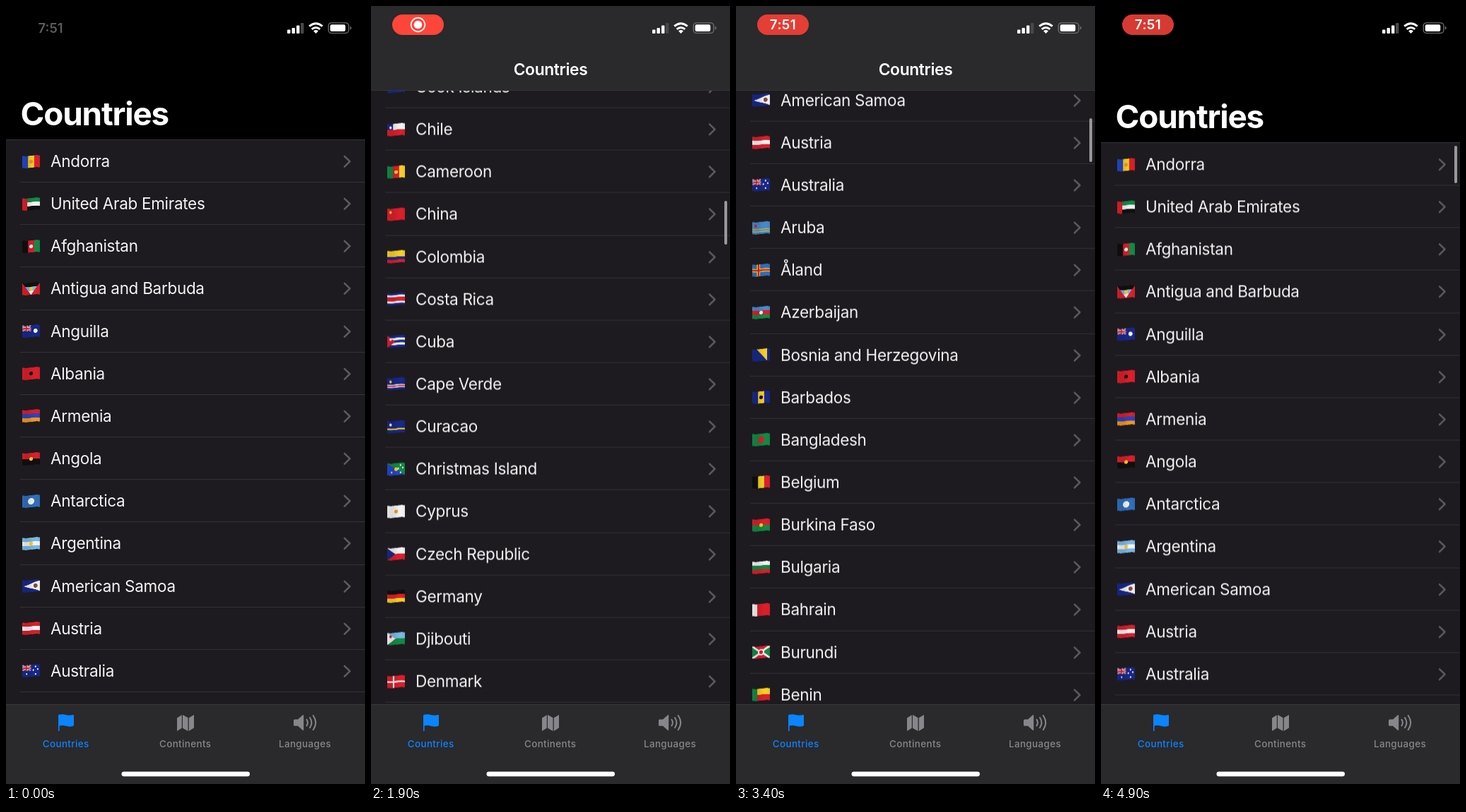
These frames come from a looping animation (508x1102 px, 5 s). An HTML page with a canvas:

```html
<!DOCTYPE html>
<html lang="en">
<head>
<meta charset="utf-8">
<title>Countries</title>
<style>
html, body { margin: 0; width: 100%; height: 100%; overflow: hidden; background: #1d1b1f; }
#stage { position: relative; width: 508px; height: 1102px; overflow: hidden; background: #1d1b1f;
  font-family: Inter, Roboto, sans-serif; color: #f4f4f5; }
#stage > * { position: absolute; left: 0; }
#list { top: 189.8px; width: 508px; will-change: transform; }
.row { position: relative; height: 60.17px; line-height: 60.17px; padding-left: 63px;
  font-size: 22.5px; letter-spacing: -.3px; white-space: nowrap; }
.row::after { content: ""; position: absolute; left: 20px; right: 0; bottom: 0; height: 1px; background: #343236; }
.row canvas { position: absolute; left: 23px; top: 20.5px; width: 25px; height: 19px; }
.row svg { position: absolute; left: 476px; top: 20px; }
#header { top: 0; width: 508px; overflow: hidden; background: #000; box-sizing: border-box; border-bottom: 1px solid #353437; }
#bar { top: 0; width: 508px; height: 119px; background: #2a292c; }
#thumb { left: 499.5px !important; width: 4.5px; border-radius: 3px; background: #98979a; }
svg text { font-family: Inter, Roboto, sans-serif; }
</style>
</head>
<body>
<div id="stage">
  <div id="list"></div>
  <div id="header">
    <svg width="508" height="260"><text id="large" x="20.5" y="169" font-size="45.8" font-weight="700" letter-spacing="-1.15" fill="#fff">Countries</text></svg>
  </div>
  <div id="bar"></div>
  <div id="thumb"></div>
  <svg width="508" height="1102" viewBox="0 0 508 1102">
    <text id="title" x="254" y="98" font-size="22.8" font-weight="600" letter-spacing="-.35" text-anchor="middle" fill="#fff">Countries</text>

    <text id="clock" x="63" y="38" font-size="18.5" font-weight="600" text-anchor="middle" fill="#5c5c5e">7:51</text>
    <g id="pill">
      <rect id="pillShape" x="30" y="12" width="73" height="29" rx="14.5"/>
      <g id="record" fill="#fff">
        <circle cx="66.5" cy="26.5" r="9.8" fill="none" stroke="#fff" stroke-width="1.7"/>
        <circle cx="66.5" cy="26.5" r="5.8"/>
      </g>
      <text id="pillClock" x="66.5" y="33.2" font-size="18.8" font-weight="600" letter-spacing=".5" text-anchor="middle" fill="#fff">7:51</text>
    </g>

    <g fill="#fff">
      <rect x="398" y="33.5" width="4.4" height="5.5" rx="1"/>
      <rect x="404.5" y="31" width="4.4" height="8" rx="1"/>
      <rect x="411" y="27.5" width="4.4" height="11.5" rx="1"/>
      <rect x="417" y="24" width="4.4" height="15" rx="1" fill="#48474a"/>
      <rect x="458.7" y="26.2" width="21.6" height="9.8" rx="2.2"/>
      <path d="M486.8 28.5q2 .8 2 2.6t-2 2.6z" fill="#6f6e71"/>
      <path d="M438.5 39l-3.4-3.6q3.4-2.6 6.8 0z"/>
    </g>
    <rect x="456.3" y="23.8" width="28.6" height="14.6" rx="4.2" fill="none" stroke="#6f6e71" stroke-width="1.3"/>
    <path d="M429.2 28.7q9.3-7.8 18.6 0M432.7 32.8q5.8-4.7 11.6 0" fill="none" stroke="#fff" stroke-width="2.9"/>

    <rect y="989" width="508" height="113" fill="#2a292c"/>
    <rect y="989" width="508" height="1" fill="#39383b"/>
    <path d="M74 1005q0-1 1-1.2 5-1.3 9.5.2 5 1.6 10.3.1 1.2-.2 1.2 1v13.5q0 1-1 1.3-5.5 1.5-10.5-.1-4.5-1.5-8.9-.2V1027H74z" fill="#0a84ff"/>
    <g fill="#87868a">
      <path d="M242 1008.5l6.8-4.3v18.6l-6.8 4.2zM250 1004l7.5 4.2v18.8l-7.5-4.2zM258.8 1008.2l7.2-4.2v18.5l-7.2 4.5z"/>
      <path d="M407 1012q0-1.5 1.5-1.5h4.5l6.5-5.8q1.7-1.4 1.7.6v19.6q0 2-1.7.6l-6.5-5.8h-4.5q-1.5 0-1.5-1.5z"/>
    </g>
    <path d="M425.5 1010.8q2.7 4.3 0 8.6M430 1008q4.8 7.1 0 14.2M434.7 1005q7 10.1 0 20.2" fill="none" stroke="#87868a" stroke-width="2" stroke-linecap="round"/>
    <g font-size="13.4" font-weight="500" letter-spacing=".4" text-anchor="middle" fill="#87868a">
      <text x="84.7" y="1050.3" fill="#0a84ff">Countries</text>
      <text x="253.7" y="1050.3">Continents</text>
      <text x="423" y="1050.3">Languages</text>
    </g>
    <rect x="163.5" y="1084.5" width="181.5" height="6.7" rx="3.35" fill="#fff"/>
  </svg>
</div>
<script>
// Each line: name, then drawing steps (one letter for the shape, the rest colours).
const countries = `Andorra:vbyr eo
United Arab Emirates:hgwk br
Afghanistan:vkrg ew
Antigua and Barbuda:hr Vkaw ey
Anguilla:hn j fw
Albania:hr ek
Armenia:hrbo
Angola:hrk ey
Antarctica:hs dw
Argentina:hawa ey
American Samoa:hn Lw fm
Austria:hrwr
Australia:hn j *w
Aruba:hccccccccccyccyccc Sr
Åland:hs xy Xr
Azerbaijan:hcrg ew
Bosnia and Herzegovina:hn Iy
Barbados:vnyn ek
Bangladesh:hg dr
Belgium:vkyr
Burkina Faso:hrg ey
Bulgaria:hwgr
Bahrain:hr bw
Burundi:hr Og /w \\w dw er
Benin:hyr bg
Saint Barthélemy:hw dl er
Bermuda:hr j fw
Brunei:hy Nwk er
Bolivia:hryg er
Bonaire:hw in Cy Sr
Brazil:hg Dy en
Bahamas:haya tk
Bhutan:hy io ew
Bouvet Island:hr xw Xn
Botswana:haaawkkwaaa
Belarus:hrrg zr
Belize:hrnnnnnnr dw eg
Canada:vrwwr er
Cocos [Keeling] Islands:hg ey *y Sy
Democratic Republic of the Congo:hc Uyr Sy
Central African Republic:hnwgy Mr Sy
Republic of the Congo:hr Cg Uy
Switzerland:hr +w
Ivory Coast:vowg
Cook Islands:hn j fw
Chile:hwr qn Sw
Cameroon:vgry ey
China:hr Sy
Colombia:hyynr
Costa Rica:hnwrrwn
Cuba:hnwnwn tr Sw
Cape Verde:hnnnnnnwrwnn Sy
Curacao:hnnnnnynn Sw
Christmas Island:hb Kg ey *w
Cyprus:hw eo
Czech Republic:hwr tn
Germany:hkry
Djibouti:hag tw Sr
Denmark:hr Xw
Dominica:hg Xy dr
Dominican Republic:hnr xw
Algeria:vgw er
Ecuador:hyynr er
Estonia:hskw
Egypt:hrwk ey
Western Sahara:hkwg tr
Eritrea:hgs tr
Spain:hryyr
Ethiopia:hgyr en
Finland:hw Xn
Fiji:hc j fw`.split("\n").map(line => line.split(":"));

const colours = { r: "#dc1f2c", w: "#f3f3f3", b: "#2546c8", n: "#18298a", y: "#f8cf26", g: "#148a45", k: "#101010",
  o: "#f5961e", s: "#2f70bd", a: "#7cb8e4", c: "#4b8ccc", l: "#c9c9d2", m: "#8a4a2c" };
const W = 24, H = 16, scale = 4;

function drawFlag(steps) {
  const flat = document.createElement("canvas");
  flat.width = W * scale;
  flat.height = H * scale;
  const g = flat.getContext("2d");
  g.scale(scale, scale);
  const rect = (c, x, y, w, h) => { g.fillStyle = colours[c]; g.fillRect(x, y, w, h); };
  const disc = (c, x, y, r) => { g.fillStyle = colours[c]; g.beginPath(); g.arc(x, y, r, 0, 7); g.fill(); };
  const poly = (c, ...p) => {
    g.beginPath();
    for (let i = 0; i < p.length; i += 2) g.lineTo(p[i], p[i + 1]);
    g.fillStyle = colours[c];
    g.fill();
  };
  const line = (c, w, x1, y1, x2, y2) => {
    g.strokeStyle = colours[c];
    g.lineWidth = w;
    g.beginPath(); g.moveTo(x1, y1); g.lineTo(x2, y2); g.stroke();
  };
  const bands = c => [...c].forEach((k, i) => rect(k, 0, i * H / c.length, W, H / c.length + .1));
  const jack = () => {
    g.save();
    g.beginPath(); g.rect(0, 0, 12, 8); g.clip();
    rect("n", 0, 0, 12, 8);
    for (const [c, w] of [["w", 1.8], ["r", .7]]) { line(c, w, 0, 0, 12, 8); line(c, w, 0, 8, 12, 0); }
    for (const [c, w] of [["w", 2.8], ["r", 1.6]]) { line(c, w, 6, 0, 6, 8); line(c, w, 0, 4, 12, 4); }
    g.restore();
  };
  const cross = (c, w) => { line(c, w, 8.5, 0, 8.5, H); line(c, w, 0, 8, W, 8); };
  const shapes = {
    h: bands,
    v: c => [...c].forEach((k, i) => rect(k, i * W / c.length, 0, W / c.length + .1, H)),
    b: c => rect(c, 0, 0, 7, H),
    z: c => rect(c, 0, 0, 2, H),
    q: c => rect(c, 0, 0, 8, 8),
    M: c => rect(c, 10, 0, 4, H),
    d: c => disc(c, 12, 8, 4.3),
    e: c => disc(c, 12, 8, 2.5),
    f: c => disc(c, 18, 8, 2.8),
    S: c => disc(c, 4.5, 5, 1.8),
    "*": c => [[18, 3], [15, 7.5], [21, 6.5], [18, 13], [6, 12]].forEach(([x, y]) => disc(c, x, y, 1.1)),
    j: jack,
    x: c => cross(c, 4.6),
    X: c => cross(c, 2.2),
    "+": c => { rect(c, 10.5, 3, 3, 10); rect(c, 7, 6.5, 10, 3); },
    t: c => poly(c, 0, 0, 11, 8, 0, H),
    i: c => poly(c, W, 0, W, H, 0, H),
    K: c => poly(c, 0, 0, W, 0, W, H),
    C: c => poly(c, 0, 0, 10, 0, 0, 8),
    I: c => poly(c, 6, 0, 20, 0, 20, H),
    L: c => poly(c, 2, 8, W, 1, W, 15),
    D: c => poly(c, 2.5, 8, 12, 2, 21.5, 8, 12, 14),
    O: c => { poly(c, 0, 0, 12, 8, 0, H); poly(c, W, 0, 12, 8, W, H); },
    "/": c => line(c, 2.6, 0, H, W, 0),
    "\\": c => line(c, 2.6, 0, 0, W, H),
    N: c => { line(c[0], 3, 0, 2, W, 11); line(c[1], 3, 0, 5, W, 14); },
    U: c => [...c].forEach((k, i) => line(k, 6 - 2 * i, 0, H, W, 0)),
    V: c => {
      g.save();
      g.beginPath(); g.moveTo(0, 0); g.lineTo(W, 0); g.lineTo(12, H); g.clip();
      bands(c);
      g.restore();
    }
  };
  steps.split(" ").forEach(step => shapes[step[0]](step.slice(1)));

  const waved = document.createElement("canvas");
  waved.width = 100;
  waved.height = 76;
  const out = waved.getContext("2d");
  for (let x = 0; x < 100; x++) {
    const u = x / 100, drop = 1.6 * Math.cos(Math.PI * u) + 1.4 * Math.sin(2 * Math.PI * u);
    out.drawImage(flat, u * flat.width, 0, 1, flat.height, x, 4 + drop, 1, 68);
    out.fillStyle = `rgba(0,0,0,${.05 + .05 * Math.sin(2 * Math.PI * u)})`;
    out.fillRect(x, 4 + drop, 1, 68);
  }
  return waved;
}

const $ = id => document.getElementById(id);
for (const [name, flag] of countries) {
  const row = document.createElement("div");
  row.className = "row";
  row.textContent = name;
  row.append(drawFlag(flag));
  row.insertAdjacentHTML("beforeend", `<svg width="16" height="21"><path d="M3 2.8l7.6 7.4-7.6 7.4" fill="none" stroke="#5d5c60" stroke-width="2.5" stroke-linecap="round" stroke-linejoin="round"/></svg>`);
  $("list").append(row);
}

const clamp = v => Math.min(1, Math.max(0, v));
const ramp = (t, from, to) => clamp((t - from) / (to - from));

// Free scrolling slows down with a 500 ms time constant.
const glideDown = t => 3422 - 1820 * Math.exp((1400 - t) / 500);
const glideUp = t => 334.5 + 1174.5 * Math.exp((2800 - t) / 500);

function scrollAt(t) {
  if (t < 930) return 0;
  if (t < 1150) return glideDown(1150) * ramp(t, 930, 1150) ** 3.1;
  if (t < 2250) return glideDown(t);
  if (t < 2500) return glideDown(2250) + (glideUp(2500) - glideDown(2250)) * ramp(t, 2250, 2500) ** 1.73;
  if (t < 4300) return glideUp(t);
  if (t < 4620) return glideUp(4300) * (1 - ramp(t, 4300, 4620) ** 1.2);
  const u = (t - 4620) / 1000;
  return -1048 * u * Math.exp(-15 * u);
}

function render(t) {
  const s = scrollAt(t);
  const header = Math.max(120, 190 - s);
  $("list").style.transform = `translateY(${-s}px)`;
  $("header").style.height = header + "px";
  $("large").setAttribute("y", 169 - s);
  $("bar").style.opacity = ramp(s, 50, 70);
  $("title").style.opacity = ramp(s, 40, 62);

  const thumb = $("thumb").style;
  thumb.top = header + 4 + .0565 * Math.max(0, s - 70) + "px";
  thumb.height = 62.5 - .075 * (header - 120) + Math.min(0, s) + "px";
  thumb.opacity = ramp(t, 930, 1000);

  // The recording pill pulses every two seconds.
  const glow = .5 + .5 * Math.cos(Math.PI * t / 1000);
  const mix = (a, b) => Math.round(a + (b - a) * glow);
  $("pillShape").setAttribute("fill", `rgb(${mix(214, 255)},${mix(58, 69)},${mix(50, 58)})`);
  $("clock").style.opacity = 1 - ramp(t, 50, 250);
  $("pill").style.opacity = ramp(t, 100, 450);
  const showClock = ramp(t, 3000, 3200);
  $("record").style.opacity = 1 - showClock;
  $("pillClock").style.opacity = showClock;
}

// The picture is held for 100 ms at a time.
const loop = 5000, hold = 100;
const start = performance.now();
function tick() {
  const t = (performance.now() - start) % loop;
  render(Math.floor(t / hold) * hold);
  requestAnimationFrame(tick);
}
tick();
</script>
</body>
</html>
```
